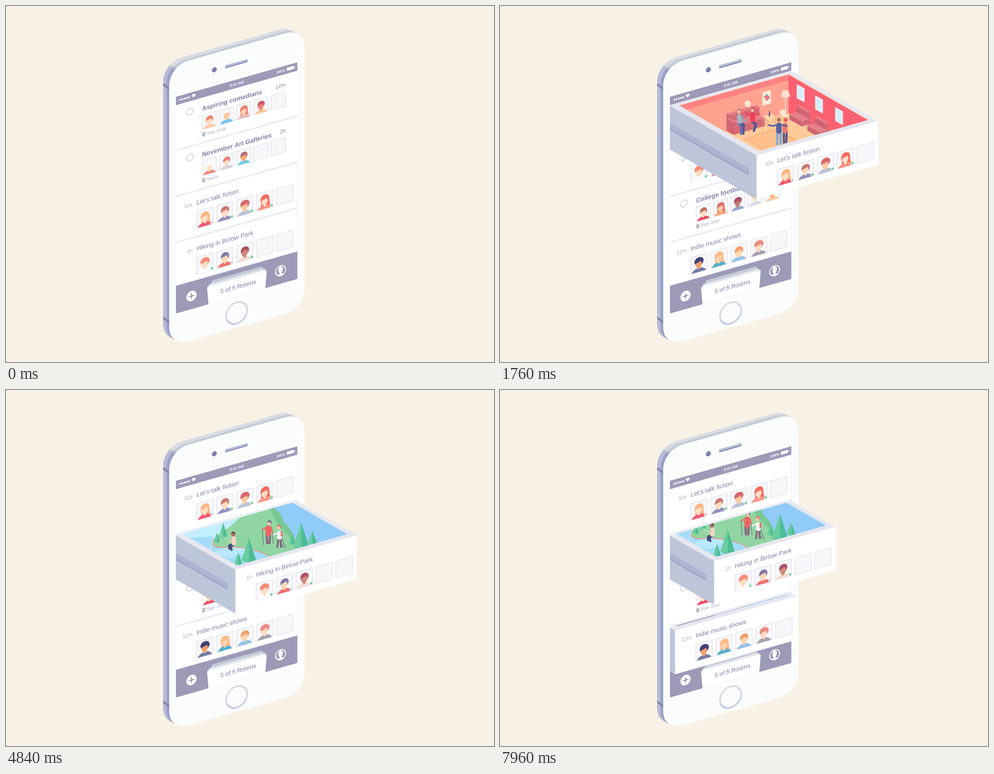
These frames come from a looping animation (876x639 px, 8 s). An HTML page with a canvas:

```html
<!DOCTYPE html>
<html lang="en">
<head>
<meta charset="utf-8">
<title>Rooms</title>
<style>
html, body { margin: 0; width: 100%; height: 100%; overflow: hidden; background: #f8f1e5; }
canvas { display: block; }
</style>
</head>
<body>
<canvas id="stage" width="876" height="639"></canvas>
<script>
const ctx = document.getElementById('stage').getContext('2d');
const LOOP = 8000, RISE = 0.284, FALL = 0.574, ROW = 82.5, WIDTH = 218;
const PURPLE = '#9d9ab8', MUTED = '#aaa9c0', INK = '#7f7da6';

// Avatars: hair, skin, shirt, style, status dot
const rows = [
  { title: 'Aspiring comedians', time: '12m', place: 'San Jose', people: [
    ['#ee8163', '#ffdcbd', '#ffcaa3'], ['#e9a68a', '#ffc99e', '#6fc4f4', 'bald'],
    ['#ee8476', '#ffcfae', '#e6b6b3', 'long'], ['#cb566a', '#ee8b7a', '#ffc9a0']] },
  { title: 'November Art Galleries', time: '2h', place: 'Marin', people: [
    ['#fffdf9', '#ffe2c6', '#ee8a7c'], ['#ef7b73', '#ffdcc0', '#d9d5df'],
    ['#b06c78', '#ffa66a', '#74cfe2']] },
  { title: 'Let’s talk fiction', time: '32s', drawer: true, people: [
    ['#ffb583', '#ffdfc2', '#f4596f', 'long', '#c9cbd8'], ['#cc7672', '#ffdcbd', '#9190bf', '', '#6fd09a'],
    ['#d9686d', '#ffcaa0', '#b9c2d7', 'curly', '#6fd09a'], ['#fb6a60', '#ffdfc6', '#fd9483', 'long', '#6fd09a']] },
  { title: 'Hiking in Birlow Park', time: '1h', drawer: true, people: [
    ['#fb8b79', '#ffdcc0', '#ffffff', 'curly', '#6fd09a'], ['#8279a6', '#ffd8b5', '#f2706d', '', '#c9cbd8'],
    ['#ab5562', '#d28a7c', '#f3dcd4', '', '#6fd09a']] },
  { title: 'College football', time: '54s', place: 'San Jose', people: [
    ['#c06d5f', '#ffdcbd', '#ee4c62'], ['#e0716b', '#ffcaa0', '#fca377', 'long'],
    ['#a95264', '#c27c72', '#94a4d0', 'curly'], ['#ffc796', '#ffe4cc', '#dadcea'],
    ['#574a80', '#ffa86c', '#ffc9a0']] },
  { title: 'Indie music shows', time: '12m', drawer: true, people: [
    ['#453f78', '#f2a06c', '#747ba9', 'curly'], ['#ffb984', '#ffd2ae', '#54b1cd', 'long'],
    ['#f59d69', '#ffd5ac', '#93c3ea'], ['#ea8b80', '#ffdcc0', '#a49fae', 'curly']] }
];

const clamp = p => Math.max(0, Math.min(1, p));
const sine = p => (1 - Math.cos(Math.PI * clamp(p))) / 2;

function trace(pts) {
  ctx.beginPath();
  for (let i = 0; i < pts.length; i += 2) ctx.lineTo(pts[i], pts[i + 1]);
}
function poly(color, ...pts) {
  trace(pts);
  ctx.fillStyle = color;
  ctx.fill();
}
function line(color, width, ...pts) {
  trace(pts);
  ctx.strokeStyle = color;
  ctx.lineWidth = width;
  ctx.lineCap = ctx.lineJoin = 'round';
  ctx.stroke();
}
function path(color, d) {
  ctx.fillStyle = color;
  ctx.fill(new Path2D(d));
}
function oval(color, x, y, rx, ry = rx) {
  ctx.beginPath();
  ctx.ellipse(x, y, rx, ry, 0, 0, 7);
  ctx.fillStyle = color;
  ctx.fill();
}
function ring(color, width, x, y, r) {
  ctx.beginPath();
  ctx.arc(x, y, r, 0, 7);
  ctx.strokeStyle = color;
  ctx.lineWidth = width;
  ctx.stroke();
}
function rect(color, x, y, w, h, r = 0) {
  ctx.beginPath();
  ctx.roundRect(x, y, w, h, r);
  ctx.fillStyle = color;
  ctx.fill();
}
function text(str, x, y, size, color, align = 'left', weight = '') {
  ctx.font = `${weight} ${size}px "Liberation Sans", Arial, sans-serif`;
  ctx.textAlign = align;
  ctx.fillStyle = color;
  ctx.fillText(str, x, y);
}
function group(draw) {
  ctx.save();
  draw();
  ctx.restore();
}
// Draws on a plane parallel to the phone's glass
function face(x, y, draw) {
  group(() => {
    ctx.transform(1, -RISE, 0, 1, x, y);
    draw();
  });
}
// Isometric box given by the top corner nearest to the viewer
function block(x, y, u, v, h, [top, front, left]) {
  const a = [x + u, y - RISE * u], b = [x - v, y - FALL * v];
  poly(top, x, y, ...a, a[0] - v, a[1] - FALL * v, ...b);
  poly(left, x, y, ...b, b[0], b[1] + h, x, y + h);
  poly(front, x, y, ...a, a[0], a[1] + h, x, y + h);
}

function avatar(x, y, s, person) {
  rect('#f7f7f9', x, y, s, s);
  ctx.strokeStyle = '#d9dae5';
  ctx.lineWidth = 0.8;
  ctx.strokeRect(x, y, s, s);
  if (!person) return;
  const [hair, skin, shirt, style, status] = person;
  group(() => {
    ctx.beginPath();
    ctx.rect(x, y, s, s);
    ctx.clip();
    ctx.translate(x, y);
    ctx.scale(s, s);
    if (style === 'long') path(hair, 'M.24 .44Q.26 .14 .52 .14Q.79 .14 .78 .5Q.78 .72 .86 .84H.27Q.32 .65 .24 .44');
    oval(shirt, 0.5, 1.05, 0.43, 0.3);
    rect(skin, 0.43, 0.6, 0.15, 0.24, 0.07);
    if (style !== 'bald') oval(hair, 0.51, 0.4, 0.25, 0.24);
    if (style === 'curly') {
      for (let i = 0; i < 8; i++) oval(hair, 0.51 - 0.2 * Math.cos(i * 0.45), 0.37 - 0.17 * Math.sin(i * 0.45), 0.08);
    }
    oval(skin, 0.49, 0.53, 0.185, 0.23);
    path(hair, style === 'bald' ? 'M.66 .3Q.8 .4 .68 .58Z' : 'M.28 .47Q.29 .22 .52 .21Q.74 .24 .71 .5Q.66 .44 .64 .37Q.46 .42 .28 .47');
  });
  if (status) {
    oval('#fff', x + s * 0.92, y + s * 0.9, 3.2);
    oval(status, x + s * 0.92, y + s * 0.9, 2.3);
  }
}

function drawRow({ title, time, place, people, drawer }) {
  if (drawer) {
    text(time, 30, 26, 9.3, MUTED, 'right');
    text(title, 37, 26, 11.1, INK);
    for (let i = 0; i < 5; i++) avatar(37 + 35.8 * i, 38, 30, people[i]);
    return;
  }
  ring('#bdbdcf', 1, 25, 20, 6);
  text(title, 47, 25, 11.25, INK, 'left', 'bold');
  text(time, 197, 23.5, 9.3, INK, 'right');
  for (let i = 0; i < 5; i++) avatar(47 + 30.9 * i, 33, 26, people[i]);
  path(MUTED, 'M50 73Q47 69 47 67A3 3 0 0 1 53 67Q53 69 50 73');
  oval('#fff', 50, 67, 1.2);
  text(place, 56, 71, 8.15, MUTED);
}

function drawPhone() {
  for (let i = 11; i > 0; i--) {
    const outer = i > 5;
    face(293 - i, 108 - FALL * i, () => {
      const shade = ctx.createLinearGradient(0, 0, 26, 0);
      shade.addColorStop(0.4, outer ? '#b6bbd6' : '#9aa1c6');
      shade.addColorStop(0.55, outer ? '#d9dde3' : '#c3ccd6');
      rect(shade, 0, 0, 243, 504, 34);
    });
  }
  for (const y of [138, 557]) poly('#8187b0', 282, y, 293, y + 8, 293, y + 13, 282, y + 5);
  face(293, 108, () => {
    rect('#fbfdfc', 0, 0, 243, 504, 34);
    oval('#b1b5cf', 81, 29.5, 4.8);
    oval('#6f759f', 81, 29.5, 3.8);
    oval('#9299bf', 80.5, 29, 1.6);
    rect('#838cb5', 100, 27.5, 41, 5, 2.5);
    rect('#b8c0d8', 100, 27, 41, 3.5, 1.8);
    ring('#d9dcea', 3.4, 121, 477.5, 19);
    ctx.beginPath();
    ctx.arc(121, 477.5, 19, 0.4, 2.8);
    ctx.strokeStyle = '#cbd1e4';
    ctx.stroke();
  });
}

function drawScreen(scroll) {
  face(305, 163, () => {
    rect('#fff', 0, 0, WIDTH, 389);
    group(() => {
      ctx.beginPath();
      ctx.rect(0, 15, WIDTH, 325);
      ctx.clip();
      ctx.translate(0, 13.5 - scroll);
      for (const row of rows) {
        rect('#e9ebf5', 0, -1, WIDTH, 2.8);
        if (row.drawer) rect('#e8e9f2', WIDTH - 0.8, 0, 0.8, ROW);
        drawRow(row);
        ctx.translate(0, ROW);
      }
    });
    drawStatusBar();
    drawTabBar();
  });
}

function drawStatusBar() {
  rect(PURPLE, 0, 0, WIDTH, 15);
  for (let i = 0; i < 5; i++) oval('#fff', 8 + 4 * i, 7.6, 1.6);
  path('#fff', 'M28 5.5Q32 2 36 5.5L32 10.5Z');
  text('9:41 AM', 109, 10, 6.5, '#fff', 'center', 'bold');
  text('100%', 180, 9.8, 6.4, '#fff', 'left', 'bold');
  rect('#fff', 199, 4.5, 13, 5.5, 1.5);
  rect('#fff', 212.5, 6, 1.2, 2.5);
}

function drawTabBar() {
  rect('#e6e8f1', 0, 338.4, WIDTH, 1.6);
  rect(PURPLE, 0, 339.6, WIDTH, 49.4);
  path('#c2cad6', 'M62 389L64 350Q64 348 66 348H154Q156 348 156 350L158 389Z');
  path('#e2e5ee', 'M60 389L59 355Q59 353 61 353H158Q160 353 160 355L159 389Z');
  path('#fff', 'M58.5 389L56 359Q56 357 58 357H161Q163 357 163 359L160.5 389Z');
  text('5 of 5 Rooms', 112, 376, 10.8, INK, 'center');
  oval('#fff', 28, 365.5, 9.2);
  rect(PURPLE, 23, 364.5, 10, 2);
  rect(PURPLE, 27, 360.5, 2, 10);
  ring('#fff', 1.6, 188, 365.5, 9);
  path('#fff', 'M188 358Q192 358 192 363Q192 367 190 369V371Q193 372 194 373Q188 377 182 373Q183 372 186 371V369Q184 367 184 363Q184 358 188 358');
}

function head(x, y, hair, skin = '#ffc9a8') {
  oval(hair, x, y - 1, 3.6, 3.8);
  if (skin) oval(skin, x - 0.6, y + 1, 2.7, 3);
}
function tree(x, y, w, h) {
  const base = y + h;
  path('#6acd9f', `M${x} ${y}L${x - w / 2} ${base - 4}Q${x - w / 4} ${base} ${x} ${base}Z`);
  path('#4bbd95', `M${x} ${y}L${x + w / 2} ${base - 4}Q${x + w / 4} ${base} ${x} ${base}Z`);
}
function bubble(x, y, size) {
  if (size <= 0) return;
  group(() => {
    ctx.translate(x, y);
    ctx.scale(size, size);
    oval('#ffe9d6', 0, 0, 5.5);
    poly('#ffe9d6', -1, 4, 4, 4, 3, 8);
  });
}
const pop = (t, from, to) => Math.min(sine((t - from) / 160), sine((to - t) / 160));

function livingRoom(t) {
  const sway = Math.sin(t / 260);
  const sofa = ['#e5808a', '#d56a76', '#cf6372'];
  poly('#ffcb98', 300, 100, 680, 100, 680, 300, 300, 300);
  poly('#ffa390', 305, 180, 513, 121, 513, 190, 380, 228);
  poly('#ff8283', 305, 180, 513, 121, 513, 131, 322, 186);
  poly('#fb6171', 513, 121, 655, 202, 655, 272, 513, 190);
  for (const [x, y] of [[528, 138], [561, 158], [597, 179]]) {
    poly('#f5eef2', x, y, x + 14, y + 8, x + 14, y + 33, x, y + 25);
    poly('#d5effa', x + 2, y + 3, x + 12, y + 9, x + 12, y + 29, x + 2, y + 23);
  }
  poly('#e8c8b4', 465.5, 152.5, 482, 147.5, 482, 173, 465.5, 177.5);
  poly('#fff0dd', 467, 153.5, 481, 149.5, 481, 172, 467, 176);
  for (let i = 0; i < 6; i++) oval('#dd5365', 471 + 3 * (i % 3) + (i > 2), 160 + 3 * (i > 2), 1.5);
  oval('#dd5365', 474.5, 166, 1.5);
  oval('#55a578', 474, 157, 2.5, 1.2);

  block(408, 194, 53, 6, 25, sofa);
  block(418, 214, 53, 13, 14, sofa);
  block(415, 207, 5, 13, 22, sofa);
  poly('#ffb98a', 433, 237, 487, 219, 533, 240, 476, 262);
  poly('#ffc08e', 438, 237, 487, 222, 526, 240, 476, 257);
  line('#eda06f', 0.8, 433, 237, 487, 219, 533, 240);

  line('#e8a27b', 1.4, 469, 197, 469, 209);
  line('#e8a27b', 1.4, 476, 202, 476, 214);
  line('#e8a27b', 1.4, 490, 198, 490, 208);
  poly('#ffd5aa', 467, 196, 482, 191, 492, 197, 476, 202);
  line('#5d5c92', 2.6, 479, 190, 479, 195);
  line('#5d5c92', 1.2, 479, 186, 479, 190);
  line('#ffece4', 1.4, 508, 160, 508, 194);
  oval('#ffece4', 508, 195, 4, 1.6);
  poly('#ffe0d7', 503, 149, 513, 149, 516, 160, 508, 163, 500, 160);
  for (const [x, y] of [[0, 0], [32, 20]]) {
    block(548 + x, 189 + y, 5, 20, 18, sofa);
    block(537 + x, 205 + y, 14, 22, 9, sofa);
  }

  line('#3f5aa0', 4, 425, 207, 433, 211, 432, 227);
  line('#536db4', 3, 423, 209, 428, 213, 428, 228);
  line('#a9b1c4', 9, 425, 196, 426, 205);
  line('#98a0b8', 3, 429, 196, 434, 204, 437, 205 + sway);
  head(425, 187, '#cc7770');
  line('#3f5aa0', 4, 449, 206, 455, 210, 451, 222);
  line('#f04257', 9, 449, 193, 449, 202);
  line('#f04257', 2.6, 445, 192, 440, 193, 436, 188 - sway);
  line('#f04257', 2.6, 452, 192, 456, 193, 461, 191 + sway);
  head(449, 184, '#d74e5c');

  line('#7fa9dc', 4, 493, 224, 493, 246);
  line('#7fa9dc', 4, 499, 224, 499, 246);
  line('#47538f', 3.6, 505, 224, 505, 243);
  line('#47538f', 3.6, 510, 224, 509, 243);
  line('#e87770', 9, 507, 212, 507, 222);
  line('#5a6099', 10, 496, 212, 496, 222);
  line('#5a6099', 3, 493, 211, 485, 213, 478, 211 + sway);
  line('#5a6099', 3, 500, 211, 510, 213);
  head(496, 203, '#b9716d', null);
  head(508, 203, '#ec5d60', null);
  bubble(440, 173, pop(t, 1480, 2250));
  bubble(503, 189, pop(t, 1540, 2860));
  bubble(440, 174, pop(t, 3875, 4700));
}

function cloud(x, y, s) {
  path('#fff', `M${x - 17 * s} ${y + 8 * s}Q${x - 12 * s} ${y - 1 * s} ${x - 6 * s} ${y}Q${x} ${y - 11 * s} ${x + 7 * s} ${y - 4 * s}Q${x + 15 * s} ${y - 7 * s} ${x + 17 * s} ${y - 2 * s}Z`);
}
function bird(x, y, size, wave) {
  if (size > 0) line('#5681bd', 1.5, x - size, y - 2 + wave, x, y + 2, x + size, y - 3 - wave);
}

function hillside(t) {
  const drift = (6760 - t) * 0.008, wave = Math.sin((t - 6760) / 240);
  poly('#c2eefd', 300, 150, 680, 150, 680, 380, 300, 380);
  poly('#afe2fb', 305, 261, 514, 201, 514, 212, 323, 266);
  poly('#91cbf8', 514, 201, 680, 297, 680, 380, 514, 300);
  for (const [x, y, s] of [[443, 249, 1], [372, 271, 0.65], [420, 265, 0.35]]) {
    cloud(x + drift, y - RISE * drift, s);
  }
  path('#91d6a2', 'M404 310Q425 284 445 274Q460 262 470 249Q492 238 501 226Q510 217 515 217L570 320L470 350Z');
  path('#79c994', 'M515 217Q523 222 530 240Q540 247 545 263Q554 272 560 282L575 320L539 275Q520 250 515 217');
  path('#91d6a2', 'M515 250Q540 272 580 318L500 330Z');
  path('#a3dcfa', 'M372 292L420 289Q408 305 430 308Q480 303 520 325L455 348Z');
  path('#b9e8fc', 'M414 319L440 309Q470 306 490 313L448 328Z');
  ctx.strokeStyle = '#e89b8f';
  ctx.lineWidth = 1.8;
  ctx.stroke(new Path2D('M419 294Q410 306 430 309Q482 304 520 325'));

  const birdSize = sine((t - 5400) / 400);
  bird(467, 268, 3 * birdSize, wave);
  bird(501, 263, 4 * birdSize, wave);
  tree(436, 264, 14, 28);
  tree(425, 282, 11, 19);
  tree(463, 317, 14, 26);
  tree(482, 291, 26, 45);
  tree(559, 282, 11, 22);
  tree(576, 264, 28, 48);
  tree(596, 279, 16, 25);

  line('#eef6f5', 0.8, 449, 298, 421, 280 + wave, 412, 318);
  line('#454d80', 4, 456, 303, 449, 307, 451, 313);
  line('#454d80', 4, 453, 303, 447, 305, 447, 311);
  line('#f3d6c4', 8, 455, 293, 455, 301);
  line('#e9bfa9', 2.4, 452, 294, 448, 299);
  head(454, 285, '#7b3e49', '#b86c60');

  line('#6b6187', 1, 506, 276, 509 + wave, 304);
  line('#6b6187', 1, 524, 278, 525 - wave, 302);
  line('#8a6681', 4, 514, 287, 515, 301);
  line('#8a6681', 4, 520, 287, 519, 301);
  line('#ee6664', 10, 517, 274, 517, 284);
  line('#ee6664', 2.8, 513, 273, 507, 277);
  line('#ee6664', 2.8, 522, 273, 524, 281);
  head(519, 265, '#655c88');
  line('#5b5d83', 1, 541, 292, 549 + wave, 310);
  line('#5b5d83', 1, 536, 294, 545 + wave, 308);
  line('#8a6681', 3.6, 535, 294, 533, 308);
  line('#8a6681', 3.6, 539, 294, 540, 308);
  line('#f6f5f3', 8, 537, 283, 537, 291);
  line('#f6f5f3', 2.6, 534, 282, 526, 287 + wave);
  line('#ee6664', 3, 541, 281, 541, 288);
  head(536, 273, '#ee7270');
}

function concert() {
  poly('#6f6a85', 300, 340, 385, 340, 385, 520, 300, 520);
  poly('#a5acbd', 385, 340, 440, 340, 440, 520, 385, 520);
  poly('#6fb6e2', 440, 340, 540, 340, 540, 520, 440, 520);
}

// anchor: where the scene's coordinates put the drawer's near corner
const drawers = [
  { row: 5, open: 7880, close: 1e5, rest: 152, scene: concert, anchor: [314, 431] },
  { row: 3, open: 4525, close: 7635, rest: 153, scene: hillside, anchor: [458, 349] },
  { row: 2, open: 1140, close: 4260, rest: 151, scene: livingRoom, anchor: [456, 266] }
];

function depthAt(t, { open, close, rest }) {
  if (t < open) return 0;
  if (t > close) return rest * Math.cos(clamp((t - close) / 500) * Math.PI / 2);
  const age = t - open, peak = rest + 7.5;
  return age < 520 ? peak * sine(age / 520) : peak - 7.5 * sine((age - 520) / 240);
}

function drawDrawer(drawer, t, scroll) {
  const d = depthAt(t, drawer);
  if (d < 0.3) return;
  const x = 305 + d, y = 179 + ROW * drawer.row - scroll + FALL * d;
  const rim = 8.3, back = Math.min(d, drawer.rest);
  const at = (u, v) => [x + u - v, y - RISE * u - FALL * v];
  block(x, y, WIDTH, d, 78.5, ['#e6e7f0', '#fff', '#bdc6d8']);
  if (d > 14) {
    const groove = (color, from, to) =>
      poly(color, 305, y - FALL * d + from, x - 14, y - FALL * 14 + from, x - 14, y - FALL * 14 + to, 305, y - FALL * d + to);
    groove('#adb5d3', 31, 43.5);
    groove('#9ba2c8', 41, 43.5);
  }
  if (back > rim) group(() => {
    trace([...at(12, rim), ...at(209, rim), ...at(209, back), ...at(12, back)]);
    ctx.clip();
    ctx.translate(x - drawer.anchor[0], y - drawer.anchor[1]);
    drawer.scene(t);
  });
  face(x, y - 2.5, () => drawRow(rows[drawer.row]));
}

function render(now) {
  const t = now % LOOP;
  const scroll = 2 * ROW * sine((t - 80) / 1063);
  rect('#f8f1e5', 0, 0, 876, 639);
  drawPhone();
  drawScreen(scroll);
  for (const drawer of drawers) drawDrawer(drawer, t, scroll);
}

const start = performance.now();
(function tick() {
  render(performance.now() - start);
  requestAnimationFrame(tick);
})();
</script>
</body>
</html>
```
